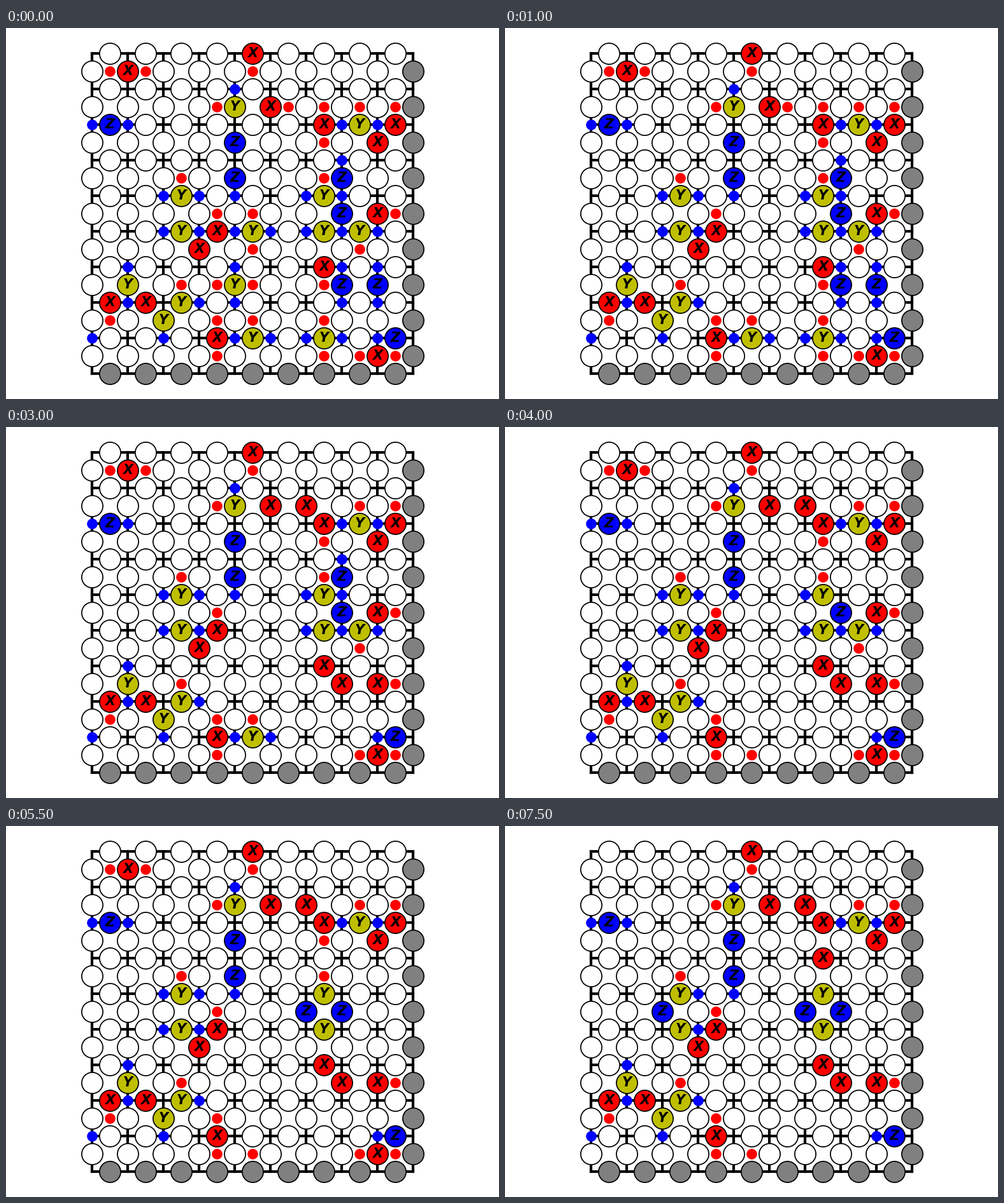
Animation, 774 px wide and 584 px high, one loop 8 s. Source, as a matplotlib script:

```python
import matplotlib.pyplot as plt
from matplotlib.animation import FuncAnimation
from matplotlib.patches import Circle

W, H, DPI = 774, 584, 100
N = 18                       # the lattice wraps around after N half-steps
STEP, X0, Y0 = 28, 135, 40
COLORS = {"I": "white", "X": "#ff0000", "Y": "#bfbf00", "Z": "#0000ff"}
BITS = {"I": 0, "X": 1, "Z": 2, "Y": 3}
NAMES = {bits: name for name, bits in BITS.items()}

# Initial errors per row: operator followed by column.
START = {
    0: "X9", 1: "X2", 3: "Y8 X10", 4: "Z1 X13 Y15 X17", 5: "Z8 X16",
    7: "Z8 Z14", 8: "Y5 Y13", 9: "Z14 X16", 10: "Y5 X7 Y9 Y13 Y15",
    11: "X6", 12: "X13", 13: "Y2 Y8 Z14 Z16", 14: "X1 X3 Y5", 15: "Y4",
    16: "X7 Y9 Y13 Z17", 17: "X16",
}
# One operator is applied per step.
MOVES = [
    ("Y", 8, 13), ("Y", 9, 10), ("Y", 14, 13), ("Y", 13, 16), ("X", 12, 3),
    ("Y", 16, 13), ("Z", 14, 7), ("Y", 9, 16), ("Z", 12, 9), ("X", 16, 9),
    ("Y", 15, 10), ("X", 16, 17), ("X", 2, 1), ("Z", 4, 9), ("X", 13, 6),
]


def pos(c, r):
    return X0 + STEP * c + 0.5, Y0 + STEP * r + 0.5


def errors_at(step):
    errors = {}
    for r, row in START.items():
        for item in row.split():
            errors[int(item[1:]), r] = BITS[item[0]]
    for op, c, r in MOVES[:step]:
        errors[c, r] = errors.get((c, r), 0) ^ BITS[op]
    return errors


def syndrome(errors):
    """Sites with odd parity: X flips plaquettes, Z flips vertices."""
    lit = set()
    for (c, r), bits in errors.items():
        for dc, dr in ((1, 0), (-1, 0), (0, 1), (0, -1)):
            site = (c + dc) % N, (r + dr) % N
            if bits & (1 if site[0] % 2 else 2):
                lit ^= {site}
    return lit


fig = plt.figure(figsize=(W / DPI, H / DPI), dpi=DPI, facecolor="white")
ax = fig.add_axes([0, 0, 1, 1])
ax.set(xlim=(0, W), ylim=(H, 0))
ax.axis("off")

for k in range(0, N + 1, 2):
    x, y = X0 + STEP * k, Y0 + STEP * k
    ax.plot([X0, X0 + STEP * N], [y, y], color="black", lw=3, zorder=1)
    ax.plot([x, x], [Y0, Y0 + STEP * N], color="black", lw=3, zorder=1)

dots, qubits, labels = {}, {}, {}
for r in range(N + 1):
    for c in range(N + 1):
        edge = c == N or r == N
        if (c + r) % 2:
            face = "#808080" if edge else "white"
            disc = ax.add_patch(Circle(pos(c, r), 16.6, fc=face, ec="black",
                                       lw=1.25, zorder=3))
            if not edge:
                qubits[c, r] = disc
                labels[c, r] = ax.text(*pos(c, r), "", ha="center", va="center",
                                       family="DejaVu Sans", size=15,
                                       weight="bold", style="italic", zorder=4)
        elif not edge:
            color = COLORS["X" if c % 2 else "Z"]
            dots[c, r] = ax.add_patch(Circle(pos(c, r), 8.3, fc=color, lw=0,
                                             zorder=2))


def draw(step):
    errors = errors_at(step)
    lit = syndrome(errors)
    for site, dot in dots.items():
        dot.set_visible(site in lit)
    for site, disc in qubits.items():
        name = NAMES[errors.get(site, 0)]
        disc.set_facecolor(COLORS[name])
        labels[site].set_text("" if name == "I" else name)
    return []


anim = FuncAnimation(fig, draw, frames=len(MOVES) + 1, init_func=lambda: [],
                     interval=500, repeat=True, repeat_delay=0)
plt.show()
```
